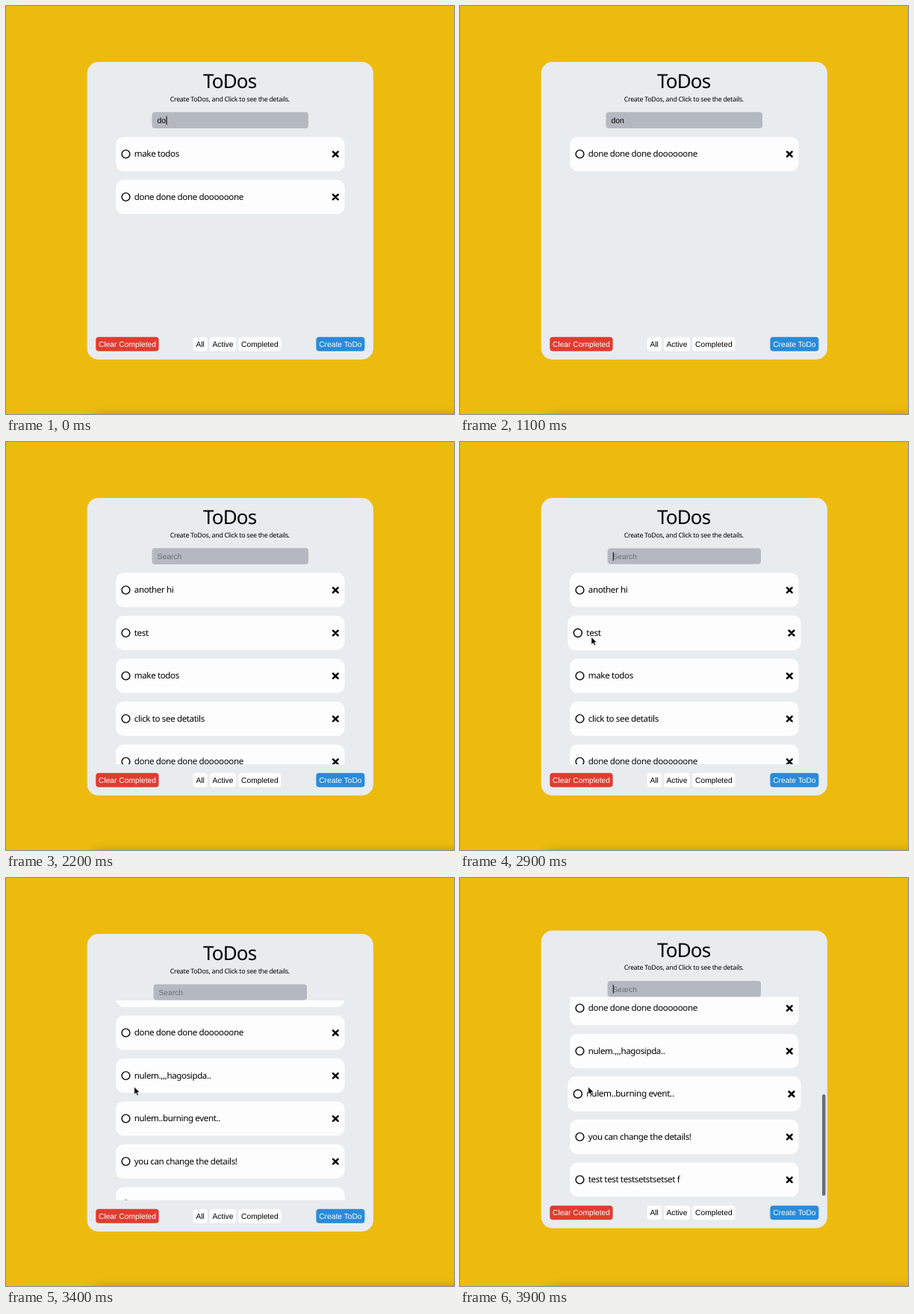
An HTML page that plays this animation: 600 by 547 pixels, repeating every 4000 ms.

```html
<!DOCTYPE html>
<html lang="en">
<head>
<meta charset="utf-8">
<title>ToDos</title>
<style>
  html, body { margin: 0; height: 100%; overflow: hidden; background: #edbb0d; }
  svg { display: block; overflow: hidden; font: 11.55px "Noto Sans", sans-serif; text-rendering: geometricPrecision; }
  text { letter-spacing: -.032em; }
  .ui { font: 10.25px "Liberation Sans", Arial, sans-serif; }
  .ui text { letter-spacing: 0; }
  .mid { text-anchor: middle; }
  .shade { filter: blur(8px); opacity: .4; }
</style>
</head>
<body>
<svg width="600" height="547" viewBox="0 0 600 547">
  <defs>
    <clipPath id="view"><rect x="109" y="164" width="383" height="268"/></clipPath>
  </defs>
  <rect class="shade" x="118" y="552" width="600" height="60"/>
  <g id="page">
    <rect x="108.7" y="75" width="383.2" height="399" rx="15" fill="#e8ecef"/>
    <text class="mid" x="299.7" y="110" font-size="26">ToDos</text>
    <text class="mid" x="299.8" y="127.7" font-size="8.85">Create ToDos, and Click to see the details.</text>
    <g id="list" clip-path="url(#view)"></g>
    <g id="input" class="ui"></g>
    <g id="buttons" class="ui mid"></g>
    <rect id="bar" x="485" y="294.5" width="4.5" height="136" rx="2.25" fill="#6b6e72"/>
  </g>
  <path id="mouse" d="M0 0V10.2L2.4 8L4 11.7L5.8 10.9L4.2 7.3H7.3Z" fill="#000" stroke="#fff" stroke-width=".7"/>
</svg>
<script>
const LOOP = 4000, STEP = 100, PITCH = 57.5, TOP = 175.5, HEIGHT = 46;
const $ = id => document.getElementById(id);
const todos = ["another hi", "test", "make todos", "click to see detatils", "done done done doooooone",
  "nulem.,,,hagosipda..", "nulem..burning event..", "you can change the details!", "test test testsetstsetset f"];

// [start time, search text]
const queries = [[0, "do"], [400, "don"], [1200, "do"], [1300, "d"], [1700, ""]];
const queryAt = t => queries.findLast(q => q[0] <= t)[1];

// Linear interpolation through [time, value] points
function track(t, points) {
  if (t <= points[0][0]) return points[0][1];
  for (let i = 1; i < points.length; i++) {
    const [a, from] = points[i - 1], [b, to] = points[i];
    if (t < b) return from + (to - from) * (t - a) / (b - a);
  }
  return points.at(-1)[1];
}

// Time since the todo last entered the filtered list
function ageOf(todo, t) {
  let start = -1e4, shown = true;
  for (const [time, query] of queries) {
    if (time > t) break;
    const match = todo.includes(query);
    if (match && !shown) start = time;
    shown = match;
  }
  return t - start;
}

const scaled = (x, y, s) => `translate(${x} ${y}) scale(${s}) translate(${-x} ${-y})`;

function card(todo, y, scale, opacity) {
  const mid = y + HEIGHT / 2;
  return `<g transform="${scaled(300.3, mid, scale)}" opacity="${opacity}">
    <rect x="147.2" y="${y}" width="306.3" height="${HEIGHT}" rx="10" fill="#fdfdfe"/>
    <circle cx="160.5" cy="${mid}" r="5.4" fill="none" stroke="#000" stroke-width="1.4"/>
    <text x="171.8" y="${mid + 3.6}">${todo}</text>
    <path d="M438 ${mid - 3.2}l6.6 6.6m0 -6.6l-6.6 6.6" stroke="#000" stroke-width="2.5" stroke-linecap="round"/></g>`;
}

function drawList(t, mouseY) {
  const scroll = track(t, [[3000, 0], [3100, 45], [3200, 124.5], [3300, 188], [3400, 221], [3600, 221], [3700, 238], [3800, 249.5]]);
  const canHover = t >= 2600 && t < 3100 || t >= 3900;
  $("list").innerHTML = todos.filter(todo => todo.includes(queryAt(t))).map((todo, i) => {
    const y = TOP + i * PITCH - scroll;
    const enter = Math.min(1, ageOf(todo, t) / 300);
    const hover = canHover && mouseY >= y && mouseY <= y + HEIGHT;
    return card(todo, y, (hover ? 1.019 : 1) + .1 * (1 - enter), .3 + .7 * enter);
  }).join("");
}

function drawInput(t, mouseY) {
  const query = queryAt(t);
  const caretOn = t < 1000 || t >= 1200 && t < 2100 || t >= 2600 && t < 3100 || t >= 3600;
  const caretX = 204.8 + query.length * 5.7;
  $("input").setAttribute("transform", scaled(300.3, 153.2, mouseY < 164 ? 1.02 : 1));
  $("input").innerHTML = `<rect x="197.6" y="142.5" width="205.4" height="21.3" rx="4" fill="#b4b8c0"/>
    <text x="204.4" y="157" fill="${query ? "#000" : "#6c6f75"}">${query || "Search"}</text>` +
    (caretOn ? `<rect x="${caretX}" y="147.7" width="1" height="11.5"/>` : "");
}

function draw(t) {
  const moved = track(t, [[2600, 0], [2700, .2], [2900, .85], [3000, 1]]);
  const mouseY = 156 + 124 * moved;
  const shift = track(t, [[3800, 0], [3900, -4.5]]);
  drawInput(t, mouseY);
  drawList(t, mouseY - shift);
  $("page").setAttribute("transform", `translate(0 ${shift})`);
  $("bar").setAttribute("visibility", t >= 3800 ? "visible" : "hidden");
  $("mouse").setAttribute("visibility", t >= 2600 ? "visible" : "hidden");
  $("mouse").setAttribute("transform", `translate(${200 - 28.3 * moved} ${mouseY})`);
}

$("buttons").innerHTML = [
  ["Clear Completed", 120.3, 84.3, "#e03c31", "#fff"],
  ["All", 250.5, 19.3, "#fdfdfe", "#000"],
  ["Active", 273, 35, "#fdfdfe", "#000"],
  ["Completed", 311.2, 57.3, "#fdfdfe", "#000"],
  ["Create ToDo", 415.4, 65, "#2a8bd8", "#fff"],
].map(([label, x, width, fill, ink]) =>
  `<rect x="${x}" y="443.7" width="${width}" height="19" rx="4" fill="${fill}"/>
   <text x="${x + width / 2}" y="456.8" fill="${ink}">${label}</text>`).join("");

let last = -1;
function tick() {
  const t = Math.floor(performance.now() % LOOP / STEP) * STEP;
  if (t !== last) draw(last = t);
  requestAnimationFrame(tick);
}
tick();
</script>
</body>
</html>
```
